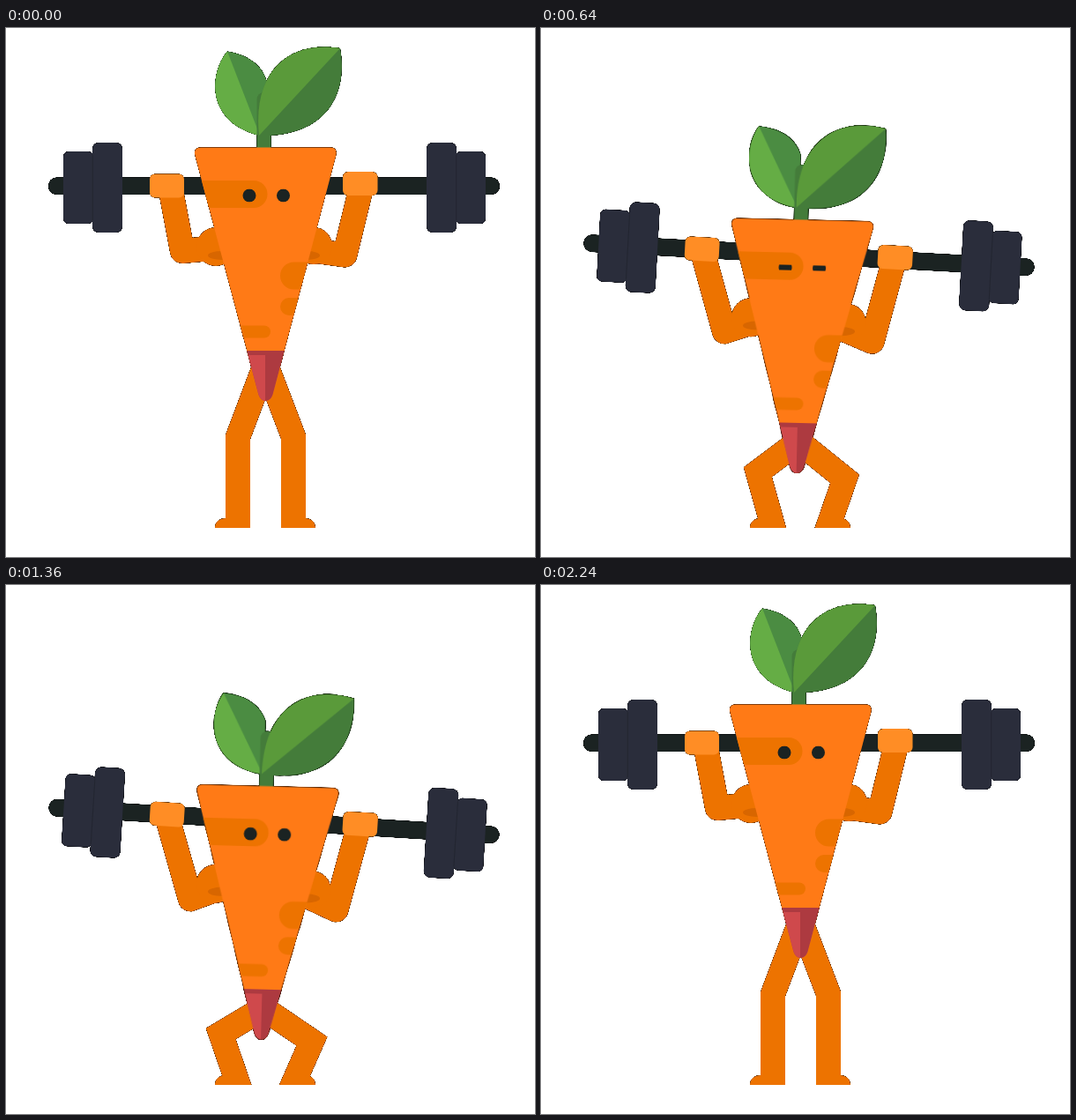
An HTML page that plays this animation: 600x600 px, repeating every 2.56 s.

```html
<!DOCTYPE html>
<html lang="en">
<head>
<meta charset="utf-8">
<title>Carrot squats</title>
<style>
html, body { margin: 0; width: 100%; height: 100%; overflow: hidden; background: #fff }
svg { display: block; width: 100vw; height: 100vh }
.limb { fill: none; stroke: #ed7300; stroke-width: 28 }
.skin { fill: #ed7300 }
.shade { fill: #d86600 }
.plate { fill: #2a2d3b }
.hand { fill: #ff8d25 }
</style>
</head>
<body>
<svg viewBox="0 0 600 600">
  <defs>
    <!-- Hairline dark rim: hard black silhouette under the smooth figure -->
    <filter id="rim" filterUnits="userSpaceOnUse" x="0" y="0" width="600" height="600" color-interpolation-filters="sRGB">
      <feComponentTransfer in="SourceAlpha"><feFuncA type="linear" slope="6" intercept="-1"/></feComponentTransfer>
      <feMerge><feMergeNode/><feMergeNode in="SourceGraphic"/></feMerge>
    </filter>
    <clipPath id="floor"><rect width="600" height="567"/></clipPath>
    <clipPath id="carrot"><path id="shape" d="M221 135.5H368Q376.5 135.5 374.2 145L302.5 416Q300 423 294.5 423T286.5 416L214.5 145Q212 135.5 221 135.5Z"/></clipPath>
    <clipPath id="lids"><rect id="lid" x="260" width="70"/></clipPath>
  </defs>
  <g filter="url(#rim)">
    <g clip-path="url(#floor)">
      <path id="legL" class="limb" stroke-miterlimit="9"/>
      <path id="legR" class="limb" stroke-miterlimit="9"/>
      <path class="skin" d="M237 567C237 560 242 556 249 556H263V567ZM351 567C351 560 346 556 339 556H326V567Z"/>
    </g>
    <g id="bar">
      <rect x="48" y="169.5" width="512" height="19.5" rx="9.7" fill="#1b2322"/>
      <rect class="plate" x="65" y="140" width="34" height="82" rx="6"/>
      <rect class="plate" x="510" y="140" width="34" height="82" rx="6"/>
      <rect class="plate" x="98" y="130" width="34" height="102" rx="7"/>
      <rect class="plate" x="477" y="130" width="34" height="102" rx="7"/>
      <path d="M98.3 144V218M510.7 144V218" stroke="#232631"/>
    </g>
    <path id="armL" class="limb" stroke-linejoin="round"/>
    <path id="armR" class="limb" stroke-linejoin="round"/>
    <circle id="shoulderL" class="skin" r="22"/>
    <circle id="shoulderR" class="skin" r="21"/>
    <ellipse id="shadeL" class="shade" rx="16" ry="5"/>
    <ellipse id="shadeR" class="shade" rx="15" ry="5"/>
    <g id="hands">
      <rect class="hand" x="163" y="165.5" width="39" height="27" rx="6"/>
      <rect class="hand" x="382" y="163" width="39.5" height="27" rx="6"/>
    </g>
    <g id="body">
      <g id="leafL">
        <path fill="#4b8c42" d="M251 26.5C277 31 292 44 296 62L290 122H288C225 107 231 50 251 26.5Z"/>
        <path fill="#65ad45" d="M251 26.5C231 50 225 107 288 122Z"/>
      </g>
      <rect x="284.5" y="73" width="16" height="72" rx="8" fill="#447c3a"/>
      <g id="leafR">
        <path fill="#447c3a" d="M379 23C388 72 366 124 287 122C279 44 326 14 379 23Z"/>
        <path fill="#5a9a3a" d="M379 23C326 14 279 44 287 122Z"/>
      </g>
      <use href="#shape" fill="#ff7a16"/>
      <g clip-path="url(#carrot)">
        <g class="skin">
          <rect x="190" y="173" width="106.5" height="31" rx="15.5"/>
          <rect x="311" y="265.5" width="80" height="31" rx="15.5"/>
          <rect x="311" y="306" width="60" height="20" rx="10"/>
          <rect x="240" y="337.5" width="60" height="14" rx="7"/>
        </g>
        <rect x="260" y="366" width="70" height="60" fill="#ad3a40"/>
        <rect x="260" y="371" width="34" height="55" fill="#cf494c"/>
      </g>
      <g clip-path="url(#lids)" fill="#1b2322">
        <circle cx="276" cy="190" r="7.5"/>
        <circle cx="314.5" cy="190" r="7.5"/>
      </g>
    </g>
  </g>
</svg>
<script>
const LOOP = 2560, STEP = 40, END = 2240, BOTTOM = 1000;

const $ = id => document.getElementById(id);
const set = (id, attrs) => {
  for (const key in attrs) $(id).setAttribute(key, attrs[key]);
};
// Cosine ease from 0 at time a to 1 at time b
const ease = (t, a, b) => {
  const u = Math.min(1, Math.max(0, (t - a) / (b - a)));
  return (1 - Math.cos(Math.PI * u)) / 2;
};
const dip = (t, low) => ease(t, 0, low) - ease(t, low, END);

// Each joint: x, y standing, then its travel to the deepest squat
const limbs = {
  armL: [[186, 179, -5, 101], [200, 253, 11.3, 128], [255, 248, 0, 113.5]],
  armR: [[404, 176.5, -4, 118], [384.3, 257.5, -12.3, 137.5], [335, 250.6, 0, 123]],
  legL: [[292, 387, -2, 116.5], [263, 464, -24, 55.8], [263, 567, 0.8, 0]],
  legR: [[297, 387.5, -4, 116.5], [326, 463.5, 26, 67], [326, 567, -1, 0]]
};
const spots = {
  shoulderL: [238, 248, 0, 112.6],
  shoulderR: [349, 247, -2, 122],
  shadeL: [245, 258, 0, 111.5],
  shadeR: [341, 258, 0, 121]
};

function draw(t) {
  const p = dip(t, BOTTOM);
  const at = ([x, y, dx, dy]) => [x + dx * p, y + dy * p];

  for (const id in limbs) {
    const [a, b, c] = limbs[id].map(at);
    const points = [a, b, c];
    // Shins run past the floor and are clipped there
    if (id.startsWith('leg')) points[2] = c.map((v, i) => v + (v - b[i]) * .6);
    set(id, { d: 'M' + points.join('L') });
  }
  for (const id in spots) {
    const [cx, cy] = at(spots[id]);
    set(id, { cx, cy });
  }

  const lift = `translate(0 ${110 * p}) rotate(${4.4 * p} 304 179)`;
  set('bar', { transform: lift });
  set('hands', { transform: lift });
  set('body', { transform: `translate(0 ${115 * p}) rotate(${1.9 * p} 294.5 237)` });
  set('leafL', { transform: `rotate(${-7.5 * p} 289 122)` });
  set('leafR', { transform: `rotate(${7.1 * dip(t, 1120)} 289 122)` });

  const height = 15 - 9 * (ease(t, 260, 500) - ease(t, 1000, 1240));
  set('lid', { y: 190 - height / 2, height });
}

const start = performance.now();
function tick() {
  const t = (performance.now() - start) % LOOP;
  draw(Math.min(END, Math.floor(t / STEP) * STEP));
  requestAnimationFrame(tick);
}
tick();
</script>
</body>
</html>
```
